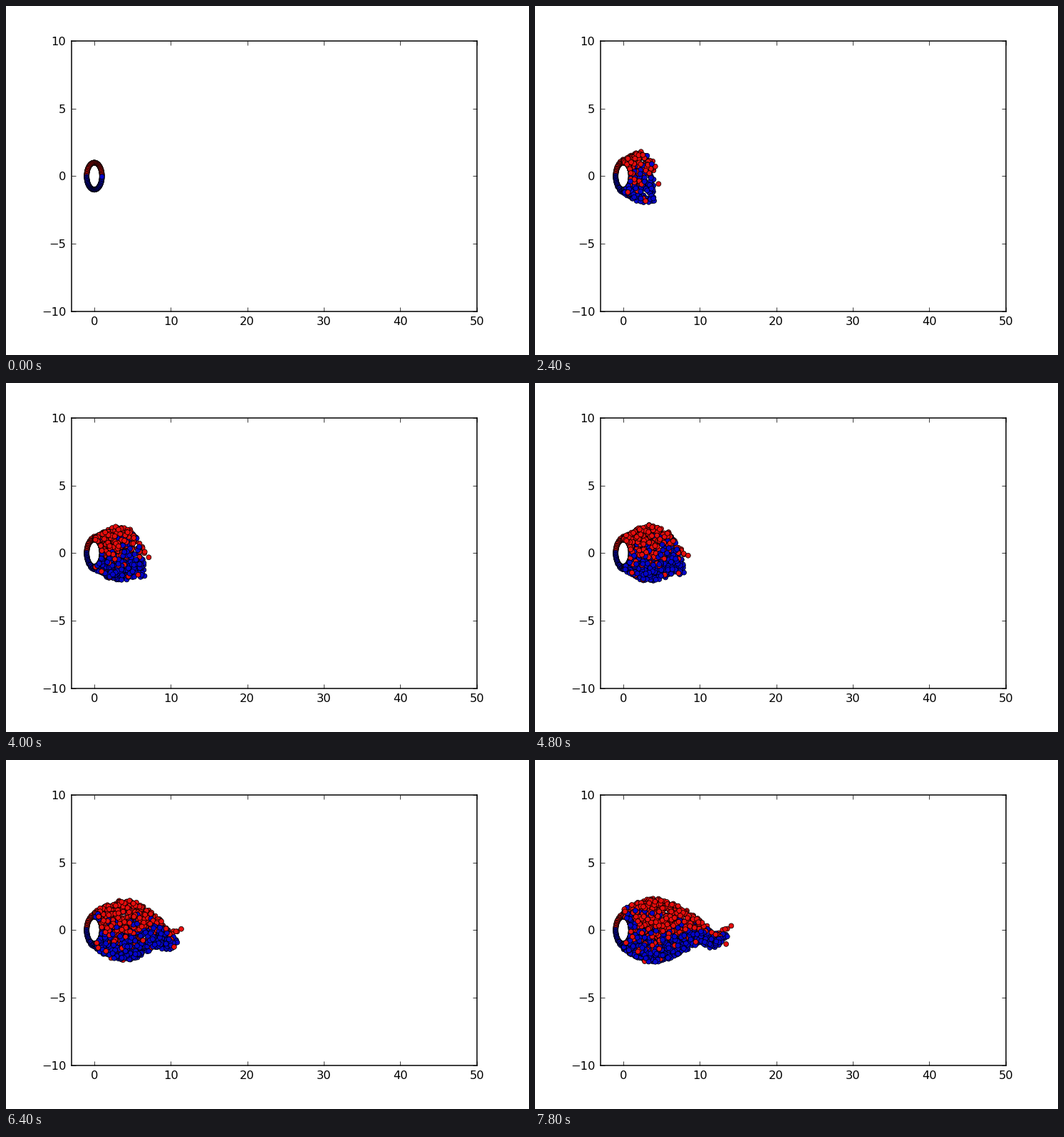
A matplotlib script for the animation above (8 s loop, 734 by 489 pixels).

```python
import numpy as np
import matplotlib.pyplot as plt
from matplotlib.animation import FuncAnimation

W, H, DPI = 734, 489, 108
FRAMES, STEP = 40, 0.2
RED, BLUE = (0.90, 0.05, 0.05), (0.02, 0.02, 0.80)

plt.rcParams.update({
    "font.family": "DejaVu Sans", "font.size": 10.8, "axes.linewidth": 1.0,
    "xtick.top": True, "ytick.right": True,
})

rng = np.random.default_rng(7)

# Vortices on the cylinder wall: a tight ring, then a loose outer layer
RING = 80
angle = (np.arange(2 * RING) + 0.5) * 2 * np.pi / RING
puff = np.where(np.arange(2 * RING) < RING, 0, rng.random(2 * RING))
flicker = rng.normal(0, 0.15, 2 * RING)

# Vortices shed into the wake
N = 1700
birth = np.floor(FRAMES * rng.random(N) ** 1.2) * STEP
pace = np.minimum(rng.uniform(0.05, 1.02, N), 1)
level = rng.uniform(-1.1, 1.1, N)
phase = rng.uniform(0, 2 * np.pi, N)
rough = rng.normal(0, 0.07, N)
mix = rng.normal(0, 1, N) * (0.25 + 0.45 * (1 - pace))
front = pace * (1 - birth / 8) > 0.72
red = level + mix > -0.25 + 0.08 * birth + 0.7 * front


def length(t):
    return 1.07 + 1.25 * t + 0.05 * t ** 2


def bump(x, mid, width):
    return np.exp(-0.5 * ((x - mid) / width) ** 2)


def half_width(x, t):
    mid = 4.4 * (1 - np.exp(-t / 3))
    return 0.22 + (1.25 + 0.1 * t) * bump(x, mid, 1.7 + 0.27 * t)


def sway(x, t):
    # the tail sags behind the tip, and the sag lags further back with time
    sag = length(t) - 0.6 * max(0, t - 4.6)
    return -0.75 * min(t / 4, 1) * bump(x, sag, 1.0)


def paint(is_red):
    return np.where(np.asarray(is_red)[:, None], RED, BLUE)


def wall(t):
    grow = min(t / 1.6, 1)
    r = 1 + 0.06 * grow * puff * (1 + np.cos(angle)) * 4
    pts = np.column_stack([r * np.cos(angle), r * np.sin(angle)])
    return pts, paint(np.sin(angle) + grow * flicker > 0)


def wake(t):
    on = birth < t - 1e-9
    tip, start = length(t), length(birth[on])
    x = pace[on] * tip * (tip - start) / (tip - length(0) + 1e-9)
    v = np.clip(level[on] + 0.12 * np.sin(0.9 * t + phase[on]), -1, 1)
    # early on the front is split into two lobes
    x = x * (1 - 0.6 * np.exp(-t / 1.2) * (1 - np.abs(v)) ** 2)
    y = sway(x, t) + v * half_width(x, t) + rough[on]
    # keep everything outside the cylinder
    push = 1 / np.minimum(np.hypot(x, y) + 1e-9, 1)
    return np.column_stack([x * push, y * push]), paint(red[on])


def leaders(t):
    if t < 1.5:
        return np.empty((0, 2)), np.empty((0, 3))
    tip = length(t)
    pts = [(tip + 0.25, -0.97 + 0.165 * t),
           (tip - 1.9 + 0.19 * t, -2.2 + 0.15 * t)]
    return np.array(pts), paint([True, True])


fig = plt.figure(figsize=((W + 0.01) / DPI, (H + 0.01) / DPI), dpi=DPI,
                 facecolor="white")
ax = fig.add_axes([0.125, 0.125, 0.775, 0.775])
ax.set(xlim=(-3, 50), ylim=(-10, 10),
       xticks=range(0, 51, 10), yticks=range(-10, 11, 5))
ax.tick_params(direction="in", length=4, width=0.5, pad=5)
dots = ax.scatter([], [], s=21, linewidths=0.5, edgecolors="black")


def draw(i):
    t = i * STEP
    pts, cols = zip(wall(t), wake(t), leaders(t))
    dots.set_offsets(np.vstack(pts))
    dots.set_facecolor(np.vstack(cols))
    return dots,


anim = FuncAnimation(fig, draw, frames=FRAMES, interval=1000 * STEP,
                     repeat=True, repeat_delay=0)
plt.show()
```
